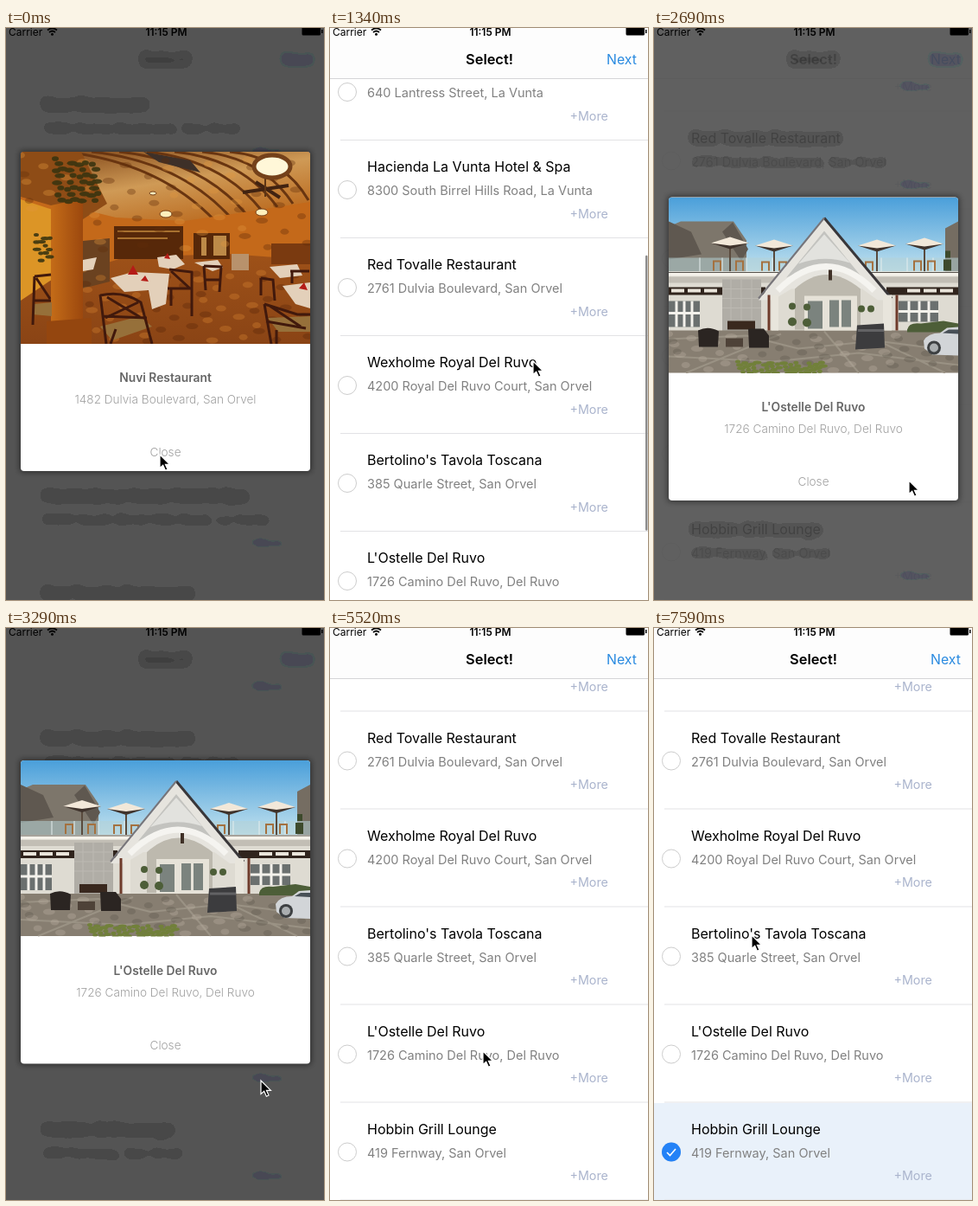
An HTML page that plays this animation: 368 by 661 pixels, repeating every 8 s.

```html
<!DOCTYPE html>
<html lang="en">
<head>
<meta charset="utf-8">
<title>Select a place</title>
<style>
  html, body { margin: 0; height: 100%; overflow: hidden; background: #fff; }
  svg { display: block; overflow: hidden; font-family: Inter, Roboto, sans-serif; }
  #stage { width: 100vw; height: 100vh; }
  .name { font-size: 16px; fill: #000; }
  .address { font-size: 14.5px; fill: #808080; }
  .more { font-size: 14.3px; fill: #aab4cd; }
  .popup text { text-anchor: middle; font-size: 13.6px; font-weight: 300; fill: #a0a0a0; }
  .popup .heading { font-size: 13.8px; font-weight: 600; fill: #666; }
</style>
</head>
<body>
<svg id="stage" viewBox="0 0 368 661">
  <defs>
    <!-- Blur, then reduce to flat tones -->
    <filter id="blur" filterUnits="userSpaceOnUse" x="-20" y="-20" width="408" height="701" color-interpolation-filters="sRGB">
      <feGaussianBlur stdDeviation="4.5"/>
      <feComponentTransfer>
        <feFuncR type="discrete" tableValues=".75 .75 .75 .75 .75 .75 .75 .75 .75 .75 .75 .86 .86 .86 .86 1"/>
        <feFuncG type="discrete" tableValues=".75 .75 .75 .75 .75 .75 .75 .75 .75 .75 .75 .86 .86 .86 .86 1"/>
        <feFuncB type="discrete" tableValues=".75 .75 .75 .75 .75 .75 .75 .75 .75 .75 .75 .86 .86 .86 .86 1"/>
      </feComponentTransfer>
      <feGaussianBlur stdDeviation=".5"/>
    </filter>
    <filter id="shadow" filterUnits="userSpaceOnUse" x="-20" y="-20" width="375" height="430">
      <feGaussianBlur stdDeviation="3"/>
    </filter>
    <clipPath id="corners"><rect width="335" height="369" rx="4"/></clipPath>
    <linearGradient id="sky" x2="0" y2="1"><stop stop-color="#4a9fda"/><stop offset="1" stop-color="#c6e4ef"/></linearGradient>
    <linearGradient id="ceiling" x2="0.6" y2="1"><stop stop-color="#7a4014"/><stop offset="0.5" stop-color="#cf9a56"/><stop offset="1" stop-color="#b9661a"/></linearGradient>
    <linearGradient id="tiles" x2="0" y2="1"><stop stop-color="#b4601c"/><stop offset="1" stop-color="#8a4415"/></linearGradient>
    <linearGradient id="pillar"><stop stop-color="#c46c18"/><stop offset="1" stop-color="#9c480e"/></linearGradient>

    <g id="diningRoom">
      <rect width="335" height="222" fill="url(#tiles)"/>
      <path d="M0 0H335V70L200 92L0 80Z" fill="url(#ceiling)"/>
      <g id="beams" fill="none" stroke="#693510" stroke-width="3"></g>
      <path d="M142 0L196 10L208 24L160 12Z" fill="#3e3028"/>
      <path d="M0 40L45 60L110 76L190 80L245 72L335 58V125L240 118L120 122L0 160Z" fill="#c4691a"/>
      <path d="M0 0H70L100 60L72 78L35 62L0 52Z" fill="#8e4c16"/>
      <path d="M0 55L40 68V145L0 172Z" fill="#dc9526"/>
      <path d="M108 86H188V124H108ZM200 94H242V124H200Z" fill="#572809"/>
      <path d="M112 92H184M112 100H170" stroke="#a8712f" stroke-width="2"/>
      <path d="M209 99H215V120H209ZM223 97H238V120H223Z" fill="#bd8a48"/>
      <path d="M244 118H264V137H244Z" fill="#b8926c"/>
      <path d="M290 106H335V130H290Z" fill="#7a3a10"/>
      <path d="M72 103L103 100V150L72 158Z" fill="#6b4220"/>
      <g id="roomGrain"></g>
      <path d="M35 62L72 54V222H35Z" fill="url(#pillar)"/>
      <path d="M30 196L82 192V222H30Z" fill="#94460f"/>
      <g id="leaves" fill="#3a3510" opacity=".9"></g>
      <path d="M257 47L310 39M272 35L300 53" stroke="#412311" stroke-width="4"/>
      <path d="M283 22V52" stroke="#5d3515" stroke-width="2"/>
      <g fill="#fff0bd" stroke="#74411a">
        <ellipse cx="291" cy="17" rx="21" ry="13" stroke-width="5" fill="#fff7d8"/>
        <ellipse cx="168" cy="72" rx="7" ry="4"/><ellipse cx="279" cy="70" rx="7" ry="4"/><ellipse cx="153" cy="48" rx="4" ry="2"/>
      </g>
      <g fill="#e3d0ba">
        <path d="M104 146L130 139L172 141L168 176L152 182L148 160L120 162Z"/>
        <path d="M158 122L180 119L190 130L176 136L160 133Z"/>
        <path d="M201 128L228 125L234 134L222 138Z"/>
        <path d="M288 133L320 130L326 143L300 146Z"/>
        <path d="M303 155L335 151V181L318 176Z"/>
        <path d="M72 125L88 122L84 136L72 138Z"/>
      </g>
      <path d="M124 142L130 131L136 142ZM139 149L144 143L148 150ZM166 123L170 117L173 124ZM322 158L328 151L332 160Z" fill="#b51c17"/>
      <g fill="#96703a">
        <path d="M92 202L138 190L152 202L106 218ZM286 192L335 190V208H298ZM16 176L36 174V190L14 188Z"/>
      </g>
      <g fill="none" stroke="#41190c" stroke-width="3">
        <path d="M92 165L99 222M92 166Q118 160 139 174L152 222M95 190L146 192M100 168L138 191M136 174L98 192M104 222L110 205"/>
        <path d="M172 136L198 139V190M170 158H198M174 138L196 158M174 178V158"/>
        <path d="M212 132L232 133L230 162M212 132L214 160M214 148H230"/>
        <path d="M282 176L290 222M282 176L320 188L335 188M284 196L330 204M288 178L324 202M296 222V206"/>
        <path d="M16 144L35 142M16 144L14 200M16 172H35M18 146L34 170"/>
        <path d="M278 146L292 148L294 172M278 146V166M312 138H334M314 138V152"/>
      </g>
    </g>

    <g id="innEntrance">
      <rect width="335" height="90" fill="url(#sky)"/>
      <path d="M0 88V34L14 28H75L90 50V88Z" fill="#7d766b"/>
      <path d="M0 28L26 40L38 66L0 72ZM74 29L92 60L84 74L62 40Z" fill="#5f5850"/>
      <path d="M320 88V36L335 28V88Z" fill="#756d62"/>
      <path d="M0 70H335V88H0Z" fill="#b4d2d6" opacity=".55"/>
      <path d="M36 70V86M62 70V86M90 70V86M120 70V86M246 70V86M276 70V86M306 70V86" stroke="#e5eeee"/>
      <path d="M52 85V74H60V85M78 85V74H86V85M108 85V75H116V85M128 85V75H136V85M228 85V75H236V85M284 85V74H292V85M300 85V74H308V85" fill="none" stroke="#a4713f" stroke-width="2"/>
      <g id="umbrellas"></g>
      <path d="M320 62h6v8h-6zM318 72h9v13h-9z" fill="#3d4a2c"/>
      <rect y="86" width="335" height="70" fill="#dedbd2"/>
      <path d="M0 86H335V91H0Z" fill="#f5f2ea"/>
      <path d="M0 87H335" stroke="#57534d"/>
      <path d="M0 92H335V99H0Z" fill="#c2beb5"/>
      <path d="M0 104H112V113H0ZM252 104H335V113H252Z" fill="#30241d"/>
      <path d="M3 108H60M276 108H332" stroke="#e9e4da" stroke-width="4" stroke-dasharray="15 4"/>
      <path d="M0 120H36V150H0ZM266 120H312V144H266Z" fill="#6b706f"/>
      <path d="M0 134H36M9 120V150M18 120V150M27 120V150M266 132H312M278 120V144M290 120V144M301 120V144" stroke="#f3f1eb" stroke-width="3"/>
      <path d="M62 95H107V158H62Z" fill="#b0ada6"/>
      <path d="M62 106H107M62 117H107M62 128H107M72 95V142M84 95V142M96 95V142" stroke="#bcb9b2"/>
      <path d="M68 143H100V153H68Z" fill="#39281e"/>
      <path d="M0 154H335V203H0Z" fill="#877e71"/>
      <path d="M0 164L90 160L150 175L240 166L335 178M20 203L130 158M220 203L180 155M320 203L230 160M0 184L120 190L220 180L335 194" fill="none" stroke="#9a9284" stroke-width="2"/>
      <g id="stoneGrain"></g>
      <path d="M180 25L258 119H242L224 106H142L120 119H104Z" fill="#e6e4de"/>
      <path d="M180 39L224 93Q182 70 136 93Z" fill="#c3c3bf"/>
      <path d="M150 77L180 43L210 76Q180 66 150 77Z" fill="#e2e2de"/>
      <path d="M126 108Q182 52 238 108" fill="none" stroke="#f5f4f0" stroke-width="7"/>
      <path d="M146 106Q182 73 222 106V153H146Z" fill="#bdb9ae"/>
      <path d="M180 24L258 117" stroke="#39373a" stroke-width="3"/>
      <path d="M104 117L180 24" stroke="#77757a" stroke-width="2"/>
      <path d="M157 114H218V154H157Z" fill="#e6e2d8"/>
      <path d="M161 120H178V152H161ZM186 119H197V150H186ZM200 119H211V150H200Z" fill="#7b837e"/>
      <path d="M187 84V96" stroke="#3f3026" stroke-width="4"/>
      <path d="M119 113H127V154H119ZM248 113H258V154H248Z" fill="#e8e5dc"/>
      <path d="M116 113V154M264 113V154" stroke="#6e3b2b" stroke-width="3"/>
      <g fill="#4d5e38">
        <circle cx="143" cy="126" r="4"/><circle cx="143" cy="144" r="5"/><circle cx="160" cy="127" r="4"/><circle cx="160" cy="145" r="5"/><circle cx="223" cy="129" r="4"/><circle cx="234" cy="129" r="4"/>
        <path d="M276 153Q278 144 292 146L318 143L335 146V156H276Z"/>
      </g>
      <path d="M34 154Q46 148 58 155L57 173H35ZM92 152H110L116 160V174H93Z" fill="#2b2522"/>
      <path d="M66 163H86V173H66Z" fill="#4e4238"/>
      <path d="M218 148L249 146L250 174L216 176Z" fill="#3c3c3e"/>
      <path d="M219 154H249" stroke="#626264" stroke-width="3"/>
      <path d="M295 166Q300 157 314 157L322 151L335 150V183L305 182L296 175Z" fill="#d2d5d8"/>
      <path d="M317 157L324 153H335V158Z" fill="#485057"/>
      <circle cx="307" cy="174" r="8" fill="#3d4042"/><circle cx="307" cy="174" r="5" fill="#aaaeb0"/>
      <g id="shrubs" fill="#71803a"></g>
    </g>

    <path id="arrow" d="M0 0V15.5L3.7 12.2L6.4 18.2L9 17L6.4 11.3H11.4Z" stroke="#fff" stroke-width="1.2"/>
  </defs>

  <g id="page">
    <rect x="-30" y="-30" width="428" height="721" fill="#fff"/>
    <g id="rows"></g>
    <path d="M-30 -30H398V58H-30Z" fill="#fdfdfd"/>
    <path d="M0 58.5H368" stroke="#d5d5d7"/>
    <text x="184.5" y="42" text-anchor="middle" font-size="16.4" font-weight="600">Select!</text>
    <text x="320" y="42" font-size="15.8" fill="#2b8be0">Next</text>
  </g>
  <rect id="scrollbar" x="365" width="2.5" rx="1.2" fill="#8c8c8c"/>
  <g id="overlay">
    <use href="#page" filter="url(#blur)"/>
    <rect width="368" height="661" opacity=".67"/>
  </g>

  <g id="statusBar">
    <text x="3" y="8.7" font-size="12">Carrier</text>
    <g fill="none" stroke="#000" stroke-width="1.7"><path d="M48 2.5Q53.5 -2 59 2.5M50 5Q53.5 2 57 5"/></g>
    <circle cx="53.5" cy="7.3" r="1.5"/>
    <text x="185.5" y="8.7" text-anchor="middle" font-size="12" font-weight="600">11:15 PM</text>
    <rect x="342.5" y="-1" width="21.5" height="9.5" rx="1.5"/><rect x="365" y="2" width="1.5" height="4"/>
  </g>

  <g id="popups"></g>
  <circle id="touch" r="21.2" fill="none" stroke="#000" stroke-width="3"/>
  <use id="cursor" href="#arrow"/>
</svg>

<script>
const LOOP = 8000, TICK = 148.6, ROW = 113;
const $ = id => document.getElementById(id);

const places = [
  ['Nuvi Restaurant', '1482 Dulvia Boulevard, San Orvel'],
  ['San Orvel Zoo', '3617 Fen Drive, San Orvel'],
  ['Elm Fort San Orvel State Heritage Park', '5108 Garnick Street, San Orvel'],
  ['FIVE-OAK Restaurant &amp; Bar', '640 Lantress Street, La Vunta'],
  ['Hacienda La Vunta Hotel &amp; Spa', '8300 South Birrel Hills Road, La Vunta'],
  ['Red Tovalle Restaurant', '2761 Dulvia Boulevard, San Orvel'],
  ['Wexholme Royal Del Ruvo', '4200 Royal Del Ruvo Court, San Orvel'],
  ["Bertolino's Tavola Toscana", '385 Quarle Street, San Orvel'],
  ["L'Ostelle Del Ruvo", '1726 Camino Del Ruvo, Del Ruvo'],
  ['Hobbin Grill Lounge', '419 Fernway, San Orvel']
];

$('rows').innerHTML = places.map(([name, address], i) => `
  <g transform="translate(0 ${58 + i * ROW})">
    ${i === 9 ? '<rect class="chosen" y="0.5" width="368" height="112" fill="#e9f1fa"/>' : ''}
    <circle cx="20" cy="57" r="10.5" fill="#fff" stroke="#cdcdcd"/>
    ${i === 9 ? `<g class="chosen"><circle cx="20" cy="57" r="11" fill="#2382f7"/>
      <path d="M15 57.5L18.5 61L25 53.5" fill="none" stroke="#fff" stroke-width="1.6"/></g>` : ''}
    <text class="name" x="43" y="36">${name}</text>
    <text class="address" x="43" y="63">${address}</text>
    <text class="more" x="277.5" y="89.5">+More</text>
    <path d="M12 112.5H368" stroke="#e2e2e5"/>
  </g>`).join('');

function popup(place, photo, photoHeight) {
  const [name, address] = places[place];
  return `<g class="popup">
    <rect x="-2" y="-2" width="339" height="${photoHeight + 151}" rx="5" opacity=".4" filter="url(#shadow)"/>
    <rect width="335" height="${photoHeight + 147}" rx="4" fill="#fff"/>
    <g clip-path="url(#corners)"><svg width="335" height="${photoHeight}"><use href="#${photo}"/></svg></g>
    <text class="heading" x="167.5" y="${photoHeight + 44}">${name}</text>
    <text x="167.5" y="${photoHeight + 69}">${address}</text>
    <text x="167.5" y="${photoHeight + 130}">Close</text>
  </g>`;
}
$('popups').innerHTML = popup(0, 'diningRoom', 222) + popup(8, 'innEntrance', 203.5);
const [roomPopup, innPopup] = $('popups').children;

// Small repeated details of the two pictures
const repeat = (n, draw) => Array.from({ length: n }, (_, i) => draw(i)).join('');
const scatter = (n, x, y, w, h, r, fill = () => '') => repeat(n, i =>
  `<ellipse cx="${x + w * (i * 0.7549 % 1)}" cy="${y + h * (i * 0.5698 % 1)}" rx="${r + i % 3}" ry="${r * 0.7}" ${fill(i)}/>`);
const grain = (dark, light) => i => `fill="${i % 2 ? dark : light}" opacity=".35"`;
$('beams').innerHTML = repeat(7, i => `<path d="M${50 + i * 32} 0Q${160 + i * 24} ${12 - i} ${225 + i * 18} ${80 - i * 4}"/>`);
$('leaves').innerHTML = scatter(36, 40, 8, 54, 50, 4) + scatter(12, 18, 96, 20, 30, 3);
$('roomGrain').innerHTML = scatter(60, 0, 4, 335, 110, 5, grain('#5e2c0a', '#e0963c'))
  + scatter(60, 72, 136, 263, 84, 5, grain('#5a260a', '#d88432'));
$('stoneGrain').innerHTML = scatter(60, 0, 158, 335, 43, 5, grain('#5d564c', '#b9b0a0'));
$('shrubs').innerHTML = scatter(45, 80, 190, 104, 14, 3);
$('umbrellas').innerHTML = [[71, 47], [122, 50], [241, 50], [296, 48]].map(([x, y]) =>
  `<path d="M${x} ${y}V86" stroke="#594a3d" stroke-width="2"/>
   <path d="M${x - 22} ${y + 6}L${x} ${y + 3}L${x + 22} ${y + 6}L${x} ${y + 13}Z" fill="#3f332c"/>
   <path d="M${x - 22} ${y + 6}L${x} ${y - 1}L${x + 22} ${y + 6}L${x} ${y + 9}Z" fill="#f2e8d9"/>`).join('');

// Keyframes: [tick, value, ...], linear in between
const cursorKeys = [[0, 178, 493], [1, 178, 495], [3, 184, 555], [5, 187, 577], [6, 190, 500], [7, 200, 395], [9, 235, 385],
  [13, 287, 451], [15, 297, 516], [18, 295, 523], [22, 295, 523], [25, 250, 420], [28, 200, 440], [30, 189, 478],
  [36, 189, 478], [38, 165, 500], [40, 100, 560], [42, 50, 603], [43, 44, 606], [45, 44, 606], [46, 70, 580],
  [47, 190, 470], [48, 284, 340], [49, 240, 308], [50, 150, 330], [51, 113, 355]];
const scrollKeys = [[5, 0], [6, 77], [7, 182], [8, 290], [9, 380], [10, 448], [11, 496], [12, 523], [13, 529], [14, 527.5], [15, 526.5]];
const dimKeys = [[0, 1], [1, 0], [16, 0], [17, 0.5], [18, 0.93], [19, 1], [31, 1], [32, 0]];
const slideKeys = [[17, 220], [18, 42.5], [19, 8], [20, 0]];

function track(keys, tick) {
  const next = keys.findIndex(key => key[0] > tick);
  if (next === 0) return keys[0].slice(1);
  if (next < 0) return keys[keys.length - 1].slice(1);
  const a = keys[next - 1], b = keys[next], u = (tick - a[0]) / (b[0] - a[0]);
  return a.slice(1).map((v, i) => v + (b[i + 1] - v) * u);
}

const between = (tick, from, to) => tick >= from && tick < to;
const show = (el, on) => { el.style.display = on ? '' : 'none'; };
const move = (el, x, y) => el.setAttribute('transform', `translate(${x} ${y})`);

function render(tick) {
  const [x, y] = track(cursorKeys, tick);
  const [scroll] = track(scrollKeys, tick);
  const [dim] = track(dimKeys, tick);

  move($('rows'), 0, -scroll);
  document.querySelectorAll('.chosen').forEach(el => show(el, tick >= 44));

  const barTop = 61 + scroll * 0.531;
  show($('scrollbar'), between(tick, 6, 17));
  $('scrollbar').setAttribute('y', barTop);
  $('scrollbar').setAttribute('height', Math.min(318, 657.5 - barTop));

  show($('overlay'), dim > 0);
  $('overlay').style.opacity = dim;
  show(roomPopup, tick < 1);
  move(roomPopup, 17, 143);
  show(innPopup, between(tick, 17, 32));
  move(innPopup, 17, 153 + track(slideKeys, tick)[0]);

  move($('cursor'), x, y);
  move($('touch'), x, y + 2);
  show($('touch'), between(tick, 5, 8) || between(tick, 16, 17) || between(tick, 44, 46));
}

let shown = -1;
function frame() {
  const tick = Math.floor(performance.now() % LOOP / TICK);
  if (tick !== shown) render(shown = tick);
  requestAnimationFrame(frame);
}
frame();
</script>
</body>
</html>
```
